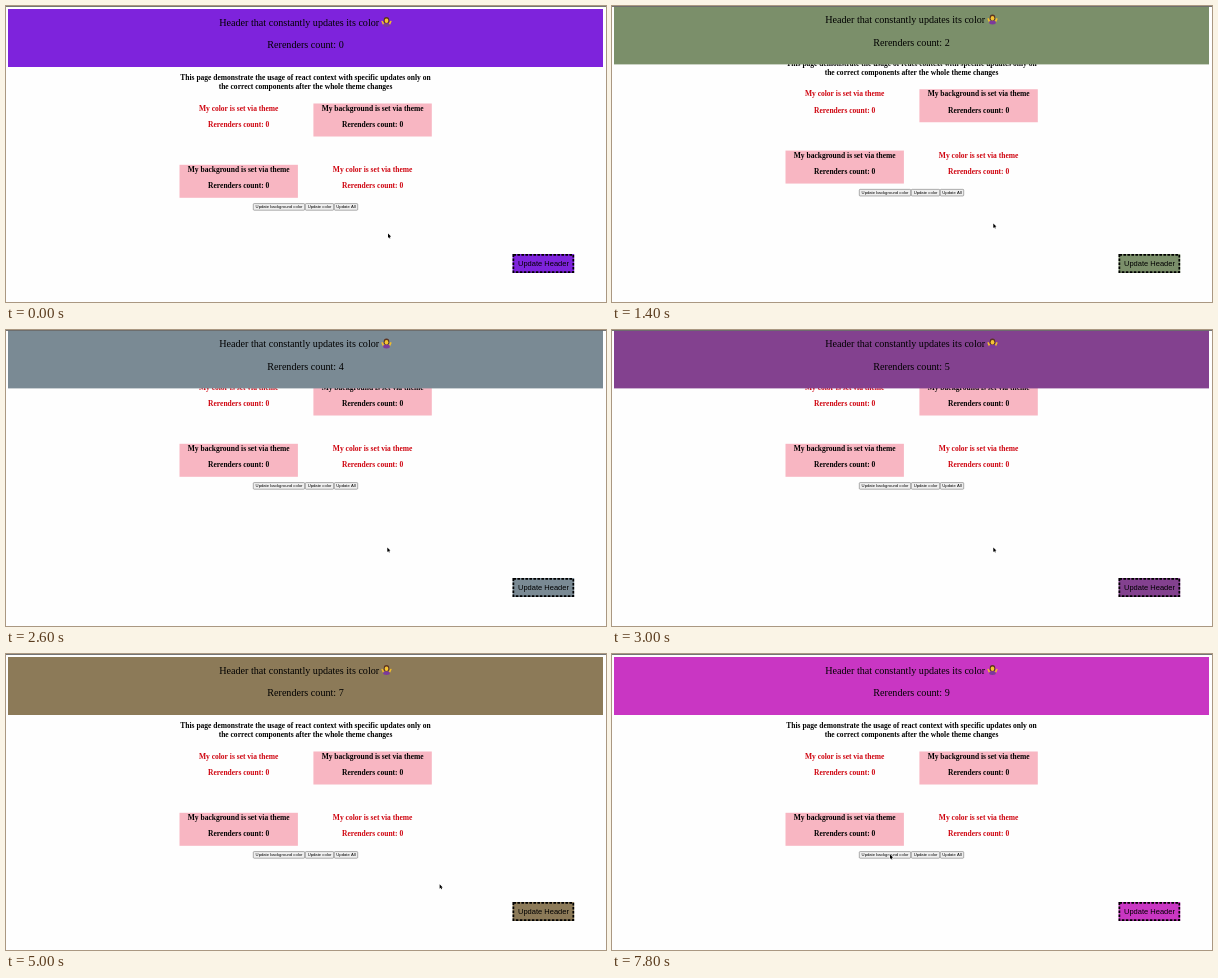
These frames come from a looping animation (600 by 296 pixels, 8 s). An HTML page with a canvas:

```html
<!DOCTYPE html>
<html lang="en">
<head>
<meta charset="utf-8">
<title>Theme context demo</title>
<style>
html, body { margin: 0; width: 100%; height: 100%; overflow: hidden; background: #fff; }
canvas { display: block; width: 600px; height: 296px; }
</style>
</head>
<body>
<canvas id="stage"></canvas>
<script>
const W = 600, H = 296, LOOP = 8000, STEP = 200;
const SERIF = '"Liberation Serif", "Times New Roman", serif';
const SANS = '"Liberation Sans", Arial, sans-serif';
const RED = '#cf0510', PINK = '#f8b6c2';

const canvas = document.getElementById('stage');
const ctx = canvas.getContext('2d');
const ratio = window.devicePixelRatio || 1;
canvas.width = W * ratio;
canvas.height = H * ratio;

// Start time and header colour of each rerender.
const renders = [
  [0, '#7e23dc'], [600, '#ac5011'], [1400, '#7b8f6a'], [1800, '#43e4f2'],
  [2400, '#7a8a94'], [2800, '#83418f'], [3800, '#862910'], [4800, '#8c7a58'],
  [5600, '#dda721'], [6800, '#c936c3']
];

// Keys: [time, value, ...]
const scrollKeys = [[0, 0], [800, 0], [1000, 3.5], [1600, 18], [2000, 28.6], [2600, 45], [3400, 45], [4000, 0]];
const cursorKeys = [
  [0, 382, 227.5], [200, 382, 227], [800, 381.3, 217.5], [4600, 381.3, 217.5],
  [5600, 530, 254], [6800, 531, 254], [7200, 541, 243], [7800, 278, 200.5]
];

function sample(keys, t) {
  const i = keys.findIndex(k => k[0] > t);
  if (i < 0) return keys[keys.length - 1].slice(1);
  const a = keys[i - 1], b = keys[i];
  const u = (t - a[0]) / (b[0] - a[0]);
  const e = u * u * (3 - 2 * u);
  return a.slice(1).map((v, n) => v + (b[n + 1] - v) * e);
}

function rect(x, y, w, h, color) {
  ctx.fillStyle = color;
  ctx.fillRect(x, y, w, h);
}

function text(str, x, y, font, color = '#000', align = 'center') {
  ctx.font = font;
  ctx.fillStyle = color;
  ctx.textAlign = align;
  ctx.fillText(str, x, y);
}

function oval(x, y, rx, ry, color) {
  ctx.fillStyle = color;
  ctx.beginPath();
  ctx.ellipse(x, y, rx, ry, 0, 0, Math.PI * 2);
  ctx.fill();
}

function card(x, y, filled) {
  const label = filled ? 'background' : 'color';
  const color = filled ? '#000' : RED;
  const font = `bold 7.53px ${SERIF}`;
  if (filled) rect(x - 59.2, y, 118.4, 33, PINK);
  text(`My ${label} is set via theme`, x, y + 7, font, color);
  text('Rerenders count: 0', x, y + 23.4, font, color);
}

function smallButton(x, w, label) {
  ctx.fillStyle = '#efefef';
  ctx.strokeStyle = '#777';
  ctx.lineWidth = 0.6;
  ctx.beginPath();
  ctx.roundRect(x + 0.3, 197.6, w - 0.6, 6.6, 0.8);
  ctx.fill();
  ctx.stroke();
  text(label, x + w / 2, 202.4, `4.2px ${SANS}`);
}

function content() {
  const font = `bold 7.53px ${SERIF}`;
  text('This page demonstrate the usage of react context with specific updates only on', 299.5, 74.3, font);
  text('the correct components after the whole theme changes', 299.5, 82.8, font);
  card(232.7, 97.5, false);
  card(366.6, 97.5, true);
  card(232.7, 158.8, true);
  card(366.6, 158.8, false);
  smallButton(247, 52, 'Update background color');
  smallButton(299, 29, 'Update color');
  smallButton(328, 24, 'Update All');
}

function shrug(x, y) {
  ctx.lineCap = 'round';
  ctx.lineJoin = 'round';
  ctx.lineWidth = 1.6;
  ctx.strokeStyle = '#f2bd2c';
  ctx.beginPath();
  ctx.moveTo(x - 4.3, y - 0.5);
  ctx.lineTo(x - 3, y + 2.2);
  ctx.moveTo(x + 4.3, y - 0.5);
  ctx.lineTo(x + 3, y + 2.2);
  ctx.stroke();
  oval(x, y - 1.6, 2.8, 3.3, '#5c3420');
  oval(x, y + 3.1, 3.4, 1.9, '#7c3a9c');
  oval(x, y - 1.2, 1.8, 2.2, '#f5c433');
  ctx.lineCap = 'butt';
  ctx.lineJoin = 'miter';
}

function header(y, color, count) {
  const font = `10.15px ${SERIF}`;
  rect(2, y, 595, 58, color);
  text('Header that constantly updates its color', 213.2, y + 16.6, font, '#000', 'left');
  shrug(380.5, y + 13);
  text(`Rerenders count: ${count}`, 299.5, y + 39.2, font);
}

function headerButton(color) {
  rect(506.6, 248, 61.6, 19, color);
  ctx.strokeStyle = '#000';
  ctx.lineWidth = 1.7;
  ctx.setLineDash([2.6, 1.4]);
  ctx.strokeRect(507.4, 248.9, 59.9, 17.2);
  ctx.setLineDash([]);
  text('Update Header', 537.5, 260.2, `7.53px ${SANS}`);
}

function cursor(x, y) {
  ctx.beginPath();
  [[0, 0], [0, 4.4], [1, 3.5], [1.7, 5], [2.4, 4.7], [1.8, 3.2], [3.1, 3.1]]
    .forEach(([dx, dy]) => ctx.lineTo(x + dx, y + dy));
  ctx.closePath();
  ctx.strokeStyle = '#fff';
  ctx.lineWidth = 0.9;
  ctx.stroke();
  ctx.fillStyle = '#000';
  ctx.fill();
}

function draw(time) {
  const t = Math.floor((time % LOOP) / STEP) * STEP;
  const count = renders.filter(r => r[0] <= t).length - 1;
  const color = renders[count][1];
  const [scroll] = sample(scrollKeys, t);

  ctx.setTransform(ratio, 0, 0, ratio, 0, 0);
  rect(0, 0, W, H, '#fefefe');
  ctx.save();
  ctx.translate(0, -scroll);
  content();
  ctx.restore();
  header(Math.max(0.4, 3 - scroll), color, count);
  rect(0, 0, W, 0.9, '#666');
  headerButton(color);
  cursor(...sample(cursorKeys, t));
}

const start = performance.now();
function tick() {
  draw(performance.now() - start);
  requestAnimationFrame(tick);
}
tick();
</script>
</body>
</html>
```
